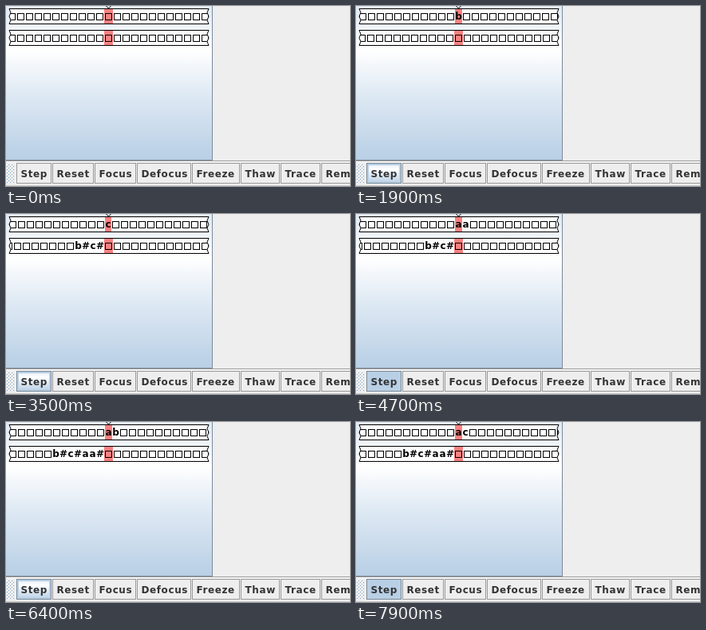
An HTML page with a canvas for the animation above (8000 ms loop, 431 px wide and 226 px high).

```html
<!DOCTYPE html>
<html lang="en">
<head>
<meta charset="utf-8">
<title>Two-tape machine</title>
<style>
html, body { margin: 0; width: 100%; height: 100%; overflow: hidden; background: #eee; }
canvas { display: block; }
</style>
</head>
<body>
<canvas id="stage" width="431" height="226"></canvas>
<script>
const ctx = document.getElementById('stage').getContext('2d');
const LOOP = 8000, MID = 128.5;
const FONT = 'bold 12px "DejaVu Sans", sans-serif';
const BLANK = ' ';
const ADVANCE = { a: 9, b: 9, c: 8, '#': 10, [BLANK]: 11 };
const BUTTONS = [['Step', 13, 44], ['Reset', 58, 52], ['Focus', 111, 52], ['Defocus', 164, 68],
  ['Freeze', 233, 60], ['Thaw', 294, 49], ['Trace', 344, 50], ['Remove', 395, 64]];

// Lists words over {a, b, c}; those with an even count of a's go to the output tape.
function runMachine(count) {
  const states = [];
  let word = '', out = '';
  const push = head => states.push({ word, head, out });
  push(0);
  word = 'a';
  push(1);
  push(0);
  while (states.length <= count) {
    const keep = word.split('a').length % 2 === 1;
    push(0);
    for (let i = 0; i < word.length; i++) {
      if (keep) out += word[i];
      push(i + 1);
    }
    if (keep) out += '#';
    let i = word.length - 1;
    push(i);
    for (; i >= 0 && word[i] === 'c'; i--) {
      word = word.slice(0, i) + 'a' + word.slice(i + 1);
      push(i);
      push(i - 1);
    }
    if (i < 0) {
      word = 'a' + word;
      i = 0;
    } else {
      const next = word[i] === 'a' ? 'b' : 'c';
      word = word.slice(0, i) + next + word.slice(i + 1);
    }
    push(i);
    while (i-- > 0) push(i);
    push(-1);
    push(0);
  }
  return states;
}
const states = runMachine(38);

function rect(x, y, w, h, color) {
  ctx.fillStyle = color;
  ctx.fillRect(x, y, w, h);
}

function frame(x, y, w, h, color) {
  ctx.strokeStyle = color;
  ctx.strokeRect(x + 0.5, y + 0.5, w - 1, h - 1);
}

function gradient(top, bottom) {
  const g = ctx.createLinearGradient(0, top, 0, bottom);
  g.addColorStop(0, '#dde8f3');
  g.addColorStop(0.3, '#fff');
  g.addColorStop(0.6, '#dde8f3');
  g.addColorStop(1, '#b8cfe5');
  return g;
}

function drawCell(ch, x, top) {
  if (ch === BLANK) {
    frame(x + 1, top + 6, 9, 9, '#000');
  } else {
    ctx.fillStyle = '#000';
    ctx.fillText(ch, x + (ADVANCE[ch] - ctx.measureText(ch).width) / 2, top + 14);
  }
}

function drawTape(top, text, head) {
  const at = i => text[i] || BLANK;
  const w = ADVANCE[at(head)], start = Math.floor(MID - w / 2);
  const edge = [0, 2, 0, 2, 0];
  ctx.beginPath();
  edge.forEach((d, i) => ctx.lineTo(4 + d, top + 0.5 + i * 4.75));
  edge.forEach((d, i) => ctx.lineTo(254 - d, top + 19.5 - i * 4.75));
  ctx.closePath();
  ctx.fillStyle = '#fff';
  ctx.fill();
  ctx.save();
  ctx.clip();
  rect(start, top, w, 20, '#ff8080');
  drawCell(at(head), start, top);
  for (let i = head + 1, x = start + w; x < 254; i++) {
    drawCell(at(i), x, top);
    x += ADVANCE[at(i)];
  }
  for (let i = head - 1, x = start; x > 4; i--) {
    x -= ADVANCE[at(i)];
    drawCell(at(i), x, top);
  }
  ctx.restore();
  ctx.strokeStyle = '#000';
  ctx.stroke();
}

function drawPanel(state) {
  rect(0, 0, 258, 193, gradient(-4, 193));
  rect(258, 0, 1, 194, '#7a8a99');
  rect(0, 193, 259, 1, '#7a8a99');
  drawTape(3, state.word, state.head);
  drawTape(30, state.out, state.out.length);
  ctx.beginPath();
  ctx.moveTo(125.5, 0);
  ctx.lineTo(128.5, 3);
  ctx.lineTo(131.5, 0);
  ctx.stroke();
}

function drawButton([label, x, w], look) {
  const y = 197, h = 26;
  if (look === 'pressed') rect(x, y, w, h, '#b8cfe5');
  if (look === 'hover') {
    rect(x, y, w, h, gradient(y, y + h));
    frame(x + 1, y + 1, w - 2, h - 2, '#b8cfe5');
    frame(x + 2, y + 2, w - 4, h - 4, '#b8cfe5');
  }
  frame(x, y, w, h, look ? '#7a8a99' : '#999');
  ctx.fillStyle = '#333';
  ctx.letterSpacing = '0.6px';
  ctx.fillText(label, x + 5.5, 215);
  ctx.letterSpacing = '0px';
}

function drawToolbar(look) {
  rect(0, 194, 431, 1, '#999');
  rect(0, 195, 431, 1, '#fff');
  rect(0, 225, 431, 1, '#ccc');
  for (let y = 198; y < 222; y += 2) {
    for (let x = (y % 4) + 0; x < 10; x += 4) {
      rect(x, y, 1, 1, '#fff');
      rect(x + 1, y + 1, 1, 1, '#6f9cc4');
    }
  }
  BUTTONS.forEach((b, i) => drawButton(b, i ? '' : look));
}

// A click every 200 ms, with one short pause in the middle.
function clickState(t) {
  if (t < 300) return { step: 0, look: '' };
  const tick = Math.floor((t - (t < 4400 ? 300 : 400)) / 100);
  const pressed = tick % 2 === 1 && t >= 500 && !(t >= 4400 && t < 4500);
  return { step: 1 + Math.floor(tick / 2), look: pressed ? 'pressed' : 'hover' };
}

function draw(now) {
  const { step, look } = clickState(now % LOOP);
  ctx.font = FONT;
  ctx.lineWidth = 1;
  rect(0, 0, 431, 226, '#eee');
  drawPanel(states[step]);
  drawToolbar(look);
  requestAnimationFrame(draw);
}
requestAnimationFrame(draw);
</script>
</body>
</html>
```
